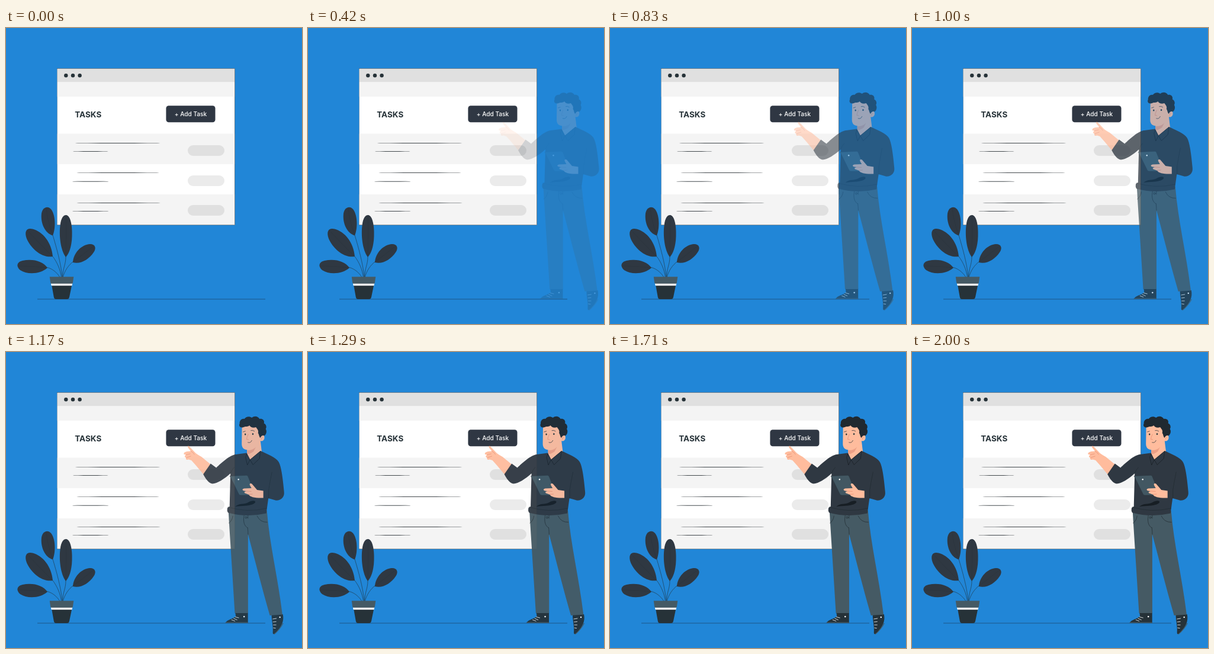
Animation, 500 px wide and 500 px high, one loop 2.04 s. Source, as an HTML page:

```html
<!DOCTYPE html>
<html lang="en">
<head>
<meta charset="utf-8">
<title>Tasks</title>
<style>
  html, body { margin: 0; width: 100%; height: 100%; overflow: hidden; background: #2186d7; }
  svg { display: block; width: 100%; height: 100%; }
  text { font-family: Inter, "Open Sans", sans-serif; }
  .ink { fill: none; stroke: #222b32; stroke-width: .7; stroke-linecap: round; stroke-linejoin: round; }
  .chalk { fill: none; stroke: #fff; stroke-width: .8; stroke-linecap: round; }
  .blush { fill: none; stroke: #e58a6f; stroke-width: .7; stroke-linecap: round; }
  .rules { fill: #42484c; }
  .dark { fill: #263238; }
  .slate { fill: #455a64; }
  .knit { fill: #2f3842; }
  .skin { fill: #ffbc9d; }
</style>
</head>
<body>
<svg viewBox="0 0 500 500">
  <path d="M53 458H438" stroke="#1c5688" stroke-width="1"/>

  <g id="window">
    <path fill="#fff" d="M86.500 68.500h300V333h-300z"/>
    <path fill="#e0e0e0" d="M86.500 68.500h300V91.500h-300z"/>
    <path fill="#f4f4f4" d="M86.500 91.500h300V116h-300zM86.500 178.500h300V230h-300zM86.500 281h300V333h-300z"/>
    <path class="ink" stroke-opacity=".7" d="M86.500 68.500h300V332.700h-300"/>
    <path class="ink" stroke-opacity=".35" d="M86.500 68.500V332.700"/>
    <g class="dark">
      <circle cx="101.300" cy="80.200" r="3.200"/>
      <circle cx="113" cy="80.200" r="3.200"/>
      <circle cx="124.600" cy="80.200" r="3.200"/>
    </g>
    <text x="116.300" y="150.800" font-size="13.500" font-weight="700" fill="#263238">TASKS</text>
    <rect x="270.400" y="131.200" width="83.100" height="28" rx="4.500" fill="#2f3743"/>
    <text x="312" y="148.600" font-size="10.100" font-weight="500" fill="#fff" text-anchor="middle">+ Add Task</text>
    <!-- tapered rules -->
    <g class="rules">
      <ellipse cx="188.500" cy="194.500" rx="72" ry=".5"/>
      <ellipse cx="142.700" cy="208.500" rx="30" ry=".5"/>
      <ellipse cx="189" cy="244.500" rx="70" ry=".5"/>
      <ellipse cx="142.700" cy="259.200" rx="31" ry=".5"/>
      <ellipse cx="190" cy="295.500" rx="71" ry=".5"/>
      <ellipse cx="142.700" cy="309.500" rx="31" ry=".5"/>
    </g>
    <rect x="307" y="198" width="62" height="18" rx="9" fill="#e0e0e0"/>
    <rect x="307" y="249" width="62" height="18" rx="9" fill="#ebebeb"/>
    <rect x="307" y="299" width="62" height="18" rx="9" fill="#e0e0e0"/>
  </g>

  <g id="plant">
    <path class="ink" stroke-opacity=".8" d="M95 421C93 398 85 370 79 350M95.500 421C96 405 101 400 101 387M93.500 421C92 408 86 395 79 386M91 421C86 413 79 407 70 404.500M96 421C99 410 106 400 113 395"/>
    <g class="knit">
      <path d="M79 350.500C66 347 58 330 60 313C62 302 71 300 76 306C84 316 84 338 79 350.500Z"/>
      <path d="M101 387C92 375 89.500 350 91.500 334C93 319 98 315.500 102 316C109 317 112.500 335 111.500 352C111 370 106 382 101 387Z"/>
      <path d="M79 386C60 389 42 372 35 356C30 342 36 337 45 339.500C62 344 77 362 79 386Z"/>
      <path d="M70 405C58 416 36 417 24 409C16 402 19 395 28 393C46 389.500 62 394 70 405Z"/>
      <path d="M113 396C114 380 127 366 142 365C151 365 153 372 148 379C140 391 126 399.500 113 396Z"/>
    </g>
    <path class="ink" opacity=".3" d="M79 350Q71 330 68 306M101 387Q102 350 101.500 319M79 386Q58 366 38 344M70 405Q45 402 22 402M113 395Q130 383 147 369"/>
    <path class="dark" d="M76.500 430.500H112L107 454.500Q106.300 458 103 458H84.500Q81.500 458 80.800 454.500Z"/>
    <path class="slate" d="M73.800 420.300H114.300L112.700 431.500H75.300Z"/>
    <path fill="#fff" d="M76 431.800H112.200L111.500 435.300H76.700Z"/>
  </g>

  <g id="person">
    <!-- shoes -->
    <path class="dark" d="M385 440H406.500V457.500H368.500C371 452 382 451 386 446Z"/>
    <path class="dark" d="M446.500 443H465.500C468 455 463 464 455 472.500C452 477 448.500 478 448.500 474C449.500 462 446 452 446.500 443Z"/>
    <path fill="none" stroke="#455a64" stroke-width="1.200" d="M368.500 457.200H406.500M466 458Q461 468 451 476.500"/>
    <path class="chalk" d="M385 447.500L391 449M382.500 450L388 452.500M379 452.500L384.500 454.500M448.500 451L454.500 450M449 456L454 455.500M449.500 461L454 461M449.500 466L453 466.500"/>
    <circle cx="400" cy="447" r="1.300" fill="#fff"/>
    <circle cx="460.500" cy="448" r="1.200" fill="#fff"/>

    <!-- trousers -->
    <path class="slate" d="M373.500 268H438.500C443 325 457 380 464.700 443.500L443.500 445C430 398 418 350 406.700 308L406.700 441H384.300C381 385 376.500 320 373.500 268Z"/>
    <path class="ink" d="M422 277Q427 288 439 287.500M374.300 289Q380 285 381 277M400 276C398 286 400 294 406 297M406.700 308Q406.700 302 406 297M406.500 276V281"/>
    <circle class="ink" cx="403.300" cy="279.500" r="1.600"/>

    <!-- pointing hand -->
    <path class="skin" d="M345 191L328 177C323 174 319 172 316 168.500L308 160C305.500 157.500 303.500 159 305.500 162L310 167.500L303.500 168C299 169 297.500 171 298.500 173L302 173.500C298.500 176 299.500 178 302 178.500C301 181.500 303 183 306 181.500L311 183L319 192L332 207.500Z"/>
    <path class="blush" d="M302 173.500L309 172M302.500 178.500L310 176M310 167.500Q314 169 316 173"/>

    <!-- neck, torso and arms -->
    <path class="skin" d="M405 158L405 180L409 190L430 170L427 145Z"/>
    <path fill="#eda086" d="M405 165.500Q414 167 420 160L416 168Q410 173 405 172Z"/>
    <path class="knit" d="M404.500 170.500L386 173C376 174 362 187 353 195.500L343.500 188.500L331 206.500C335 214 339 220 345 222.300C353 223.500 366 215 377 205L375.500 261L372 263Q370.500 268 373 271.500Q405 280 437.500 272.500L441 247L454 250.800C464 250.500 468.500 244 467.500 236C466 220 464 200 460 189C457 180 447 176 428 167L410 182Z"/>
    <path class="ink" d="M447 203Q443.500 220 441.500 233V247M377 205Q379 199 383 195M373 262Q405 272 438 264"/>
    <path class="knit" stroke="#171e23" stroke-width=".7" stroke-linejoin="round" d="M404.500 172L402.500 178L405.500 191L410 182ZM410 182L427.500 167.500L426 180L415 190.500Z"/>
    <path fill="#171e24" d="M385 261.500C390 255 400 258 407 254C412 251 419 250 419 253.500C418 258 406 259.500 398 260Q390 260 385 261.500Z"/>

    <!-- tablet -->
    <path fill="#425762" stroke="#2a363e" stroke-width=".6" stroke-linejoin="round" d="M376 209.500L404 208.200Q405.800 208.200 406.600 210L419 240.500Q419.500 242 417 242H394Q392 242 391 240Z"/>
    <circle cx="390.500" cy="215.200" r="1.200" fill="#fff"/>

    <!-- holding hand -->
    <path class="skin" d="M432.500 234.500L422 233L413 222.500C410 221 408.500 223 410 225.500L412.500 230L400 230.500C396 231.500 397 234 400 234.500L404 235C399 236 400 238.500 403 239L408 241C410 245 419 247 432.500 246.500Z"/>
    <path class="blush" d="M404 235L412 235.500M408 240.500L414 240"/>

    <!-- head -->
    <path class="skin" d="M396.500 122L396 155C396 162 400 165.500 407 165.500C415 165.500 423 160 427 150C433 152 436 146 433.500 141L430 118L410 114Z"/>
    <path fill="#202930" d="M397.500 127.500C393 128 390.500 124.500 392.500 121C392 116 396 112 400.500 113C403 109 409 108 413 111C418 107 424 109 426 113C431.500 112 435 116 433.500 120.500C437.500 122 438.500 127 436.500 130C439.500 135 436.500 140 434 141.500C431 140 428.500 142 427.500 145C425 143 425.500 139 423.500 137C425 132 422 130 420 127C415 129 411 127 409 124C406 127 402 125.500 400.500 126.500Z"/>
    <path class="blush" d="M431 143.500Q429 144 429 147.500M407 139Q404 145 404.300 147.500L407.500 148"/>
    <path class="ink" d="M398.300 135L402 133.800M411.500 132.600Q414.500 131.500 417.500 133.800M406.500 152.800Q411 154.300 413 149.500"/>
    <g class="dark">
      <ellipse cx="402" cy="139" rx="1.200" ry="1.600"/>
      <ellipse cx="414.800" cy="138.500" rx="1.200" ry="1.600"/>
    </g>
  </g>
</svg>
<script>
  const LOOP = 2040, SLIDE = 2000, FPS = 24, SHIFT = 30, REST = -.8;
  const person = document.getElementById('person');

  // One axis of a cubic Bezier running from 0 to 1.
  const bezier = (s, a, b) => 3 * (1 - s) ** 2 * s * a + 3 * (1 - s) * s * s * b + s ** 3;

  // Slow start, slight overshoot, then settle.
  function ease(x) {
    let low = 0, high = 1;
    for (let i = 0; i < 30; i++) {
      const mid = (low + high) / 2;
      if (bezier(mid, .36, .5) < x) low = mid; else high = mid;
    }
    return bezier(low, -.01, 1.38);
  }

  function draw(now) {
    const step = Math.floor((now % LOOP) * FPS / 1000);
    const time = (step + .5) * 1000 / FPS;
    const p = ease(Math.min(1, time / SLIDE));
    person.setAttribute('transform', `translate(${REST + SHIFT * (1 - p)})`);
    person.setAttribute('opacity', Math.max(0, Math.min(1, p)));
  }

  const start = performance.now();
  function tick() {
    draw(performance.now() - start);
    requestAnimationFrame(tick);
  }
  tick();
</script>
</body>
</html>
```
